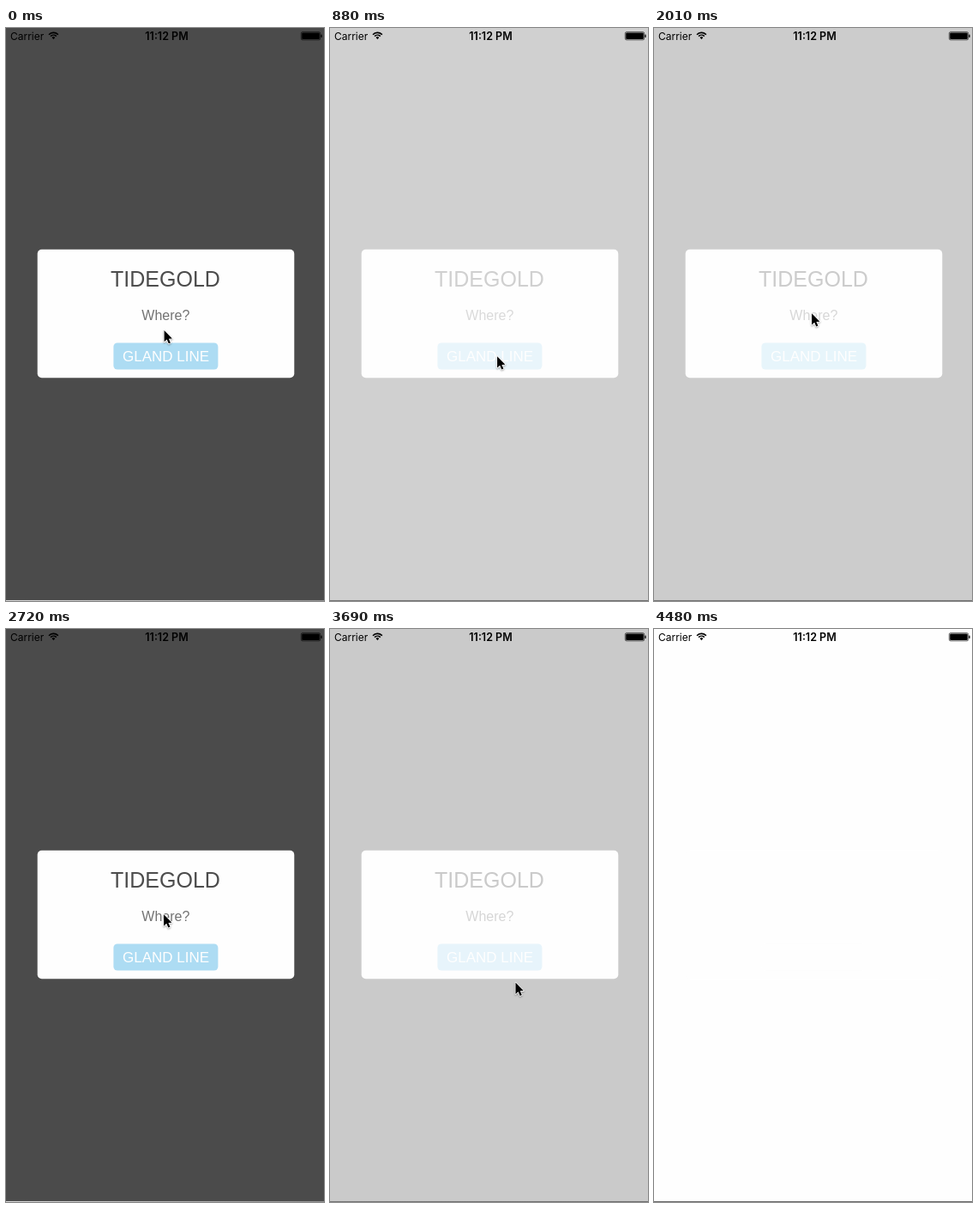
An HTML page with a canvas that plays this animation: 371x667 px, repeating every 4530 ms.

```html
<!DOCTYPE html>
<html lang="en">
<head>
<meta charset="utf-8">
<title>Dialog fade</title>
<style>
  html, body { margin: 0; width: 100%; height: 100%; overflow: hidden; background: #fefefe; }
  canvas { display: block; }
</style>
</head>
<body>
<canvas id="stage" width="371" height="667"></canvas>
<script>
const W = 371, H = 667, LOOP = 4530, FADE = 380;
const ctx = document.getElementById('stage').getContext('2d');

const POINTER_START = { x: 183.5, y: 350.8 };
const pointerMoves = [
  { from: 30, to: 430, x: 194, y: 381 },
  { from: 880, to: 1310, x: 183, y: 331 },
  { from: 2690, to: 3060, x: 197, y: 373 },
  { from: 3446, to: 4220, x: 342, y: 668 }
];

const mix = (a, b, k) => a + (b - a) * k;
const ramp = (t, from, to) => Math.min(1, Math.max(0, (t - from) / (to - from)));
const easeInOut = u => u < 0.5 ? 4 * u ** 3 : 1 - 4 * (1 - u) ** 3;

function opacityAt(t) {
  const fade = start => ramp(t, start, start + FADE);
  return 1 - fade(599) + fade(1905) - fade(3421);
}

function pointerAt(t) {
  return pointerMoves.reduce((p, move) => {
    const k = easeInOut(ramp(t, move.from, move.to));
    return { x: mix(p.x, move.x, k), y: mix(p.y, move.y, k) };
  }, POINTER_START);
}

function box(x, y, w, h, r, color) {
  ctx.fillStyle = color;
  ctx.beginPath();
  ctx.roundRect(x, y, w, h, r);
  ctx.fill();
}

function label(text, x, y, font, color, align = 'center') {
  ctx.font = font;
  ctx.fillStyle = color;
  ctx.textAlign = align;
  ctx.fillText(text, x, y);
}

// Blend toward the white page so the whole dialog fades as one group
function faded([r, g, b], a) {
  return `rgb(${[r, g, b].map(c => Math.round(mix(254, c, a))).join()})`;
}

function drawDialog(a) {
  const sans = '"Liberation Sans", Arial, sans-serif';
  ctx.fillStyle = faded([75, 75, 75], a);
  ctx.fillRect(0, 0, W, H);
  box(36.7, 257.7, 299.6, 149.6, 5, '#fefefe');
  label('TIDEGOLD', 186, 301, '25px ' + sans, faded([76, 76, 76], a));
  label('Where?', 186.3, 340, '16px ' + sans, faded([115, 115, 115], a));
  box(125.4, 366.5, 122, 31, 4.5, faded([173, 220, 243], a));
  label('GLAND LINE', 186.5, 388, '17px ' + sans, '#fefefe');
}

function drawWifi(x, y) {
  const span = [-Math.PI * 0.76, -Math.PI * 0.24];
  ctx.strokeStyle = ctx.fillStyle = '#000';
  ctx.lineWidth = 1.6;
  for (const r of [4.6, 7.4]) {
    ctx.beginPath();
    ctx.arc(x, y, r, ...span);
    ctx.stroke();
  }
  ctx.beginPath();
  ctx.moveTo(x, y + 0.4);
  ctx.arc(x, y, 2.6, ...span);
  ctx.fill();
}

function drawBattery() {
  ctx.lineWidth = 0.6;
  ctx.beginPath();
  ctx.roundRect(344.3, 4.6, 22.4, 9.3, 1.8);
  ctx.stroke();
  box(345.2, 5.4, 20.6, 7.7, 1, '#000');
  box(367.3, 7.5, 1.3, 3.5, 0.6, '#000');
}

function drawStatusBar() {
  label('Carrier', 5, 13.5, '12px Inter, sans-serif', '#000', 'left');
  label('11:12 PM', 187.5, 13.5, '600 12.5px Inter, sans-serif', '#000');
  drawWifi(55.4, 12.8);
  drawBattery();
}

const arrow = new Path2D('M0 0V14.2L3.3 11.2 5.5 16.3 7.8 15.3 5.6 10.3 9.9 10.1Z');

function drawPointer({ x, y }) {
  ctx.save();
  ctx.translate(x + 1.1, y + 1.2);
  ctx.scale(0.94, 0.94);
  ctx.lineJoin = 'round';
  ctx.lineWidth = 1.8;
  ctx.strokeStyle = '#fff';
  ctx.shadowColor = 'rgba(0,0,0,0.35)';
  ctx.shadowBlur = 2;
  ctx.shadowOffsetY = 1;
  ctx.stroke(arrow);
  ctx.shadowColor = 'transparent';
  ctx.fillStyle = '#000';
  ctx.fill(arrow);
  ctx.restore();
}

function drawBottomEdge(a) {
  const gray = v => `rgb(${v},${v},${v})`;
  const edge = ctx.createLinearGradient(0, 0, W, 0);
  edge.addColorStop(0, gray(Math.round(mix(110, 215, a * a))));
  edge.addColorStop(1, gray(Math.round(mix(110, 145, a * a))));
  ctx.fillStyle = edge;
  ctx.fillRect(0, H - 1, W, 1);
}

function draw(now) {
  const t = now % LOOP;
  const a = opacityAt(t);
  drawDialog(a);
  drawStatusBar();
  drawBottomEdge(a);
  const pointer = pointerAt(t);
  if (pointer.y < H - 2) drawPointer(pointer);
  requestAnimationFrame(draw);
}

draw(0);
</script>
</body>
</html>
```
